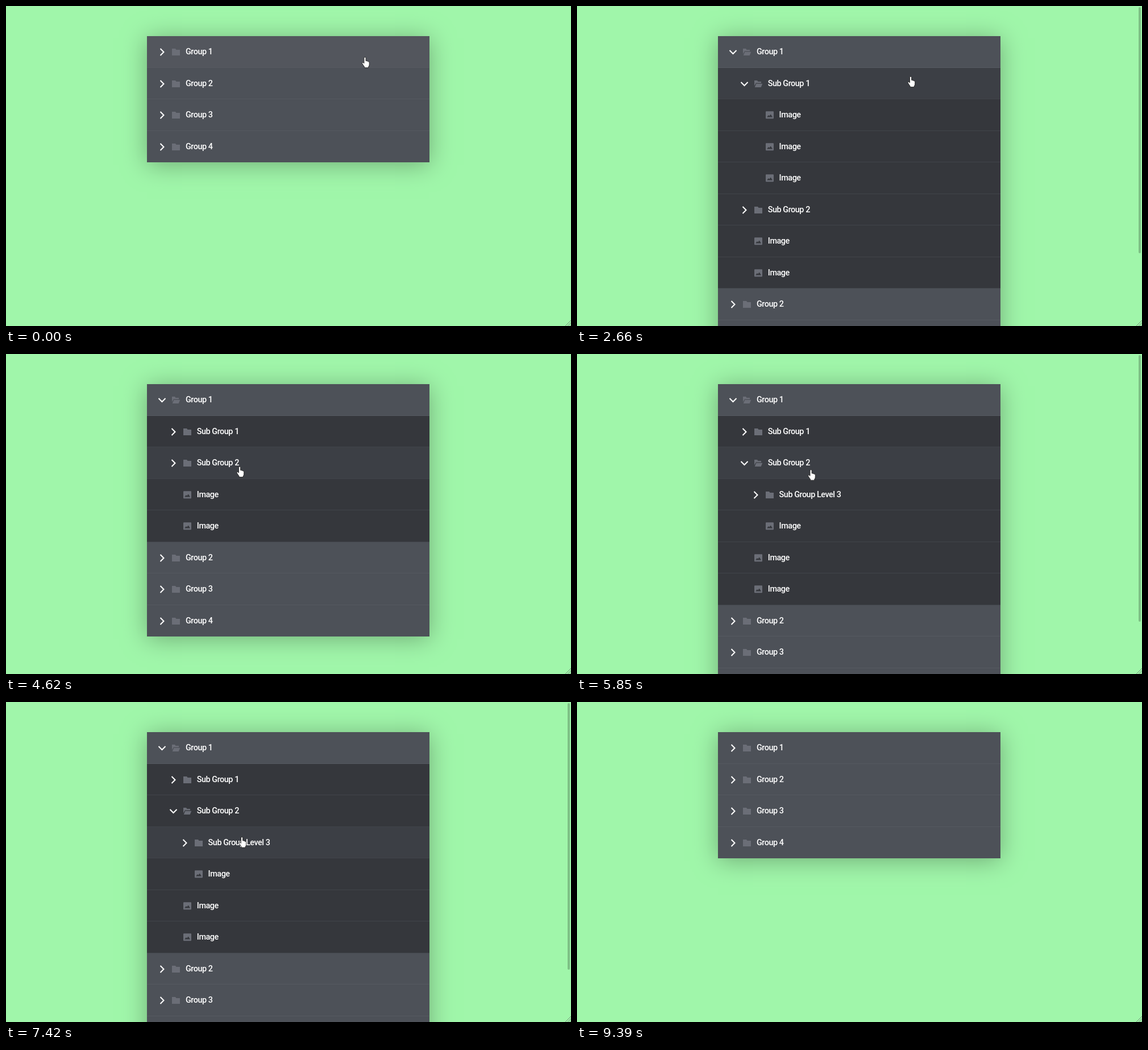
Recreate the animation shown at these times as an HTML page. Size 994 by 563 pixels, loop 9990 ms.

```html
<!DOCTYPE html>
<html lang="en">
<head>
<meta charset="utf-8">
<title>Multi-level accordion</title>
<style>
html, body { margin: 0; width: 100%; height: 100%; overflow: hidden; background: #a0f6aa; }
.stage { position: relative; width: 994px; height: 563px; overflow: hidden; }
.menu { position: absolute; left: 248px; top: 53px; width: 497px; box-shadow: 0 4px 40px #70ac76; }
.row {
  position: relative; height: 55.5px; background: #35373c; box-shadow: inset 0 -1px #41444a;
  font: 500 14.4px/55.5px Roboto, "Noto Sans", sans-serif; letter-spacing: -.45px;
  color: #fff; white-space: nowrap;
}
.row.top { background: #4d5158; box-shadow: inset 0 -1px #555960; }
.row:last-child { box-shadow: none; }
.row.hover { background: #3c3f45; }
.row.top.hover { background: #53565d; }
.row span { position: absolute; left: 68px; top: 0; }
.row svg { position: absolute; left: 0; top: 0; }
.chevron { fill: none; stroke: #fff; stroke-width: 2; transform: translate(26.5px, 28px) rotate(-90deg); }
.open .chevron { transform: translate(26.5px, 28px); }
.icon { fill: #6b6e77; }
.opened, .open .closed { display: none; }
.open .opened { display: inline; }
.bar { position: absolute; left: 988px; top: 2px; width: 4px; border-radius: 2px; background: rgba(0, 0, 0, .22); }
.over { position: absolute; left: 0; top: 0; }
</style>
</head>
<body>
<div class="stage">
  <div class="menu"></div>
  <div class="bar"></div>
  <svg class="over" width="994" height="563">
    <path d="M984 563l10-10M988 563l6-6M991.5 563l2.5-2.5" stroke="#75907a" fill="none"/>
    <g id="cursor">
      <path d="M-1.6 10V1.5Q-1.5 0 0 0T1.6 1.5V6.5q1-.8 2.2.6q1.2-.5 2 .7q1.7-.2 1.9 1.4V13q0 2.5-1.6 4V18.6H-.9V17Q-2.5 15-4.6 11.6q-.8-1.7.2-2.2q1.2-.5 2.8 1.6z"
        fill="#fff" stroke="#222" stroke-width=".9"/>
      <circle id="ring" cx=".5" cy="2" r="7.5" fill="none" stroke="#e8e8e8"/>
    </g>
  </svg>
</div>
<script>
const LOOP = 9990, TOP = 53, ROW = 55.5, INDENT = 19.8, VIEW = 563, HOLD = 60, LEAVE = 9200;

const images = n => Array(n).fill(['Image']);
const tree = [
  ['Group 1', [
    ['Sub Group 1', images(3)],
    ['Sub Group 2', [['Sub Group Level 3', images(2)], ...images(1)]],
    ...images(2)
  ]],
  ['Group 2'], ['Group 3'], ['Group 4']
];

// each press toggles one group when it is released
const clicks = [
  [1470, 'Group 1'],
  [2400, 'Sub Group 1'], [3970, 'Sub Group 1'],
  [4850, 'Sub Group 2'],
  [6300, 'Sub Group Level 3'], [7230, 'Sub Group Level 3'],
  [7960, 'Sub Group 2'],
  [8840, 'Group 1']
];

// pointer moves: start, end, x, y
const home = [631.5, 90];
const moves = [
  [1890, 2200, 587, 124], [3580, 3860, 584.5, 127.5], [4080, 4560, 411, 198],
  [5745, 6195, 415, 237.5], [7490, 7880, 400, 190], [8240, 8780, 330.5, 86],
  [8960, LEAVE, 455, 205]
];

const folder = `<path class="chevron" d="M-6-3L0 3L6-3"/>
  <path class="icon closed" d="M44 22h6l1.6 2h6.4v10h-14z"/>
  <path class="icon opened" d="M44 22h5l1.6 2h5.4v2.5h-9.2l-2.8 5zM47.3 27.8h11l-2.6 6.2h-11z"/>`;
const image = `<path class="icon" fill-rule="evenodd"
  d="M45 21.2h12q1 0 1 1v11q0 1-1 1h-12q-1 0-1-1v-11q0-1 1-1zM46.2 31.6h9.8l-3.3-5.2l-2.3 3.2l-1.6-1.5z"/>`;

const $ = s => document.querySelector(s);
const menu = $('.menu'), bar = $('.bar'), cursor = $('#cursor'), ring = $('#ring');
const show = (el, on) => { el.style.display = on ? '' : 'none'; };

const rows = [];
function build(list, level, parents) {
  for (const [label, children = []] of list) {
    const el = document.createElement('div');
    el.innerHTML = `<div style="position:absolute;left:${level * INDENT}px">
      <svg width="62" height="55">${label === 'Image' ? image : folder}</svg><span>${label}</span></div>`;
    menu.append(el);
    rows.push({ el, label, level, parents });
    build(children, level + 1, [...parents, label]);
  }
}
build(tree, 0, []);

function cursorAt(t) {
  let [x, y] = home;
  for (const [from, to, tx, ty] of moves) {
    const u = Math.min(1, Math.max(0, (t - from) / (to - from))), k = u * u * (3 - 2 * u);
    x += (tx - x) * k;
    y += (ty - y) * k;
  }
  return [x, y];
}

function draw(t) {
  const open = new Set();
  for (const [press, label] of clicks) {
    if (t >= press + HOLD && !open.delete(label)) open.add(label);
  }
  const [x, y] = cursorAt(t), visible = t < LEAVE;
  const over = visible ? Math.floor((y - TOP) / ROW) : -1;

  let n = 0;
  for (const { el, label, level, parents } of rows) {
    const shown = parents.every(p => open.has(p));
    show(el, shown);
    el.className = 'row';
    el.classList.toggle('top', level === 0);
    el.classList.toggle('open', open.has(label));
    el.classList.toggle('hover', shown && n === over);
    if (shown) n++;
  }

  const height = 116 + n * ROW;
  show(bar, height > VIEW);
  bar.style.height = (VIEW - 4) * VIEW / height + 'px';

  show(cursor, visible);
  cursor.setAttribute('transform', `translate(${x} ${y})`);
  show(ring, clicks.some(([press]) => t >= press && t < press + HOLD));
}

const start = performance.now();
function tick() {
  draw((performance.now() - start) % LOOP);
  requestAnimationFrame(tick);
}
tick();
</script>
</body>
</html>
```
